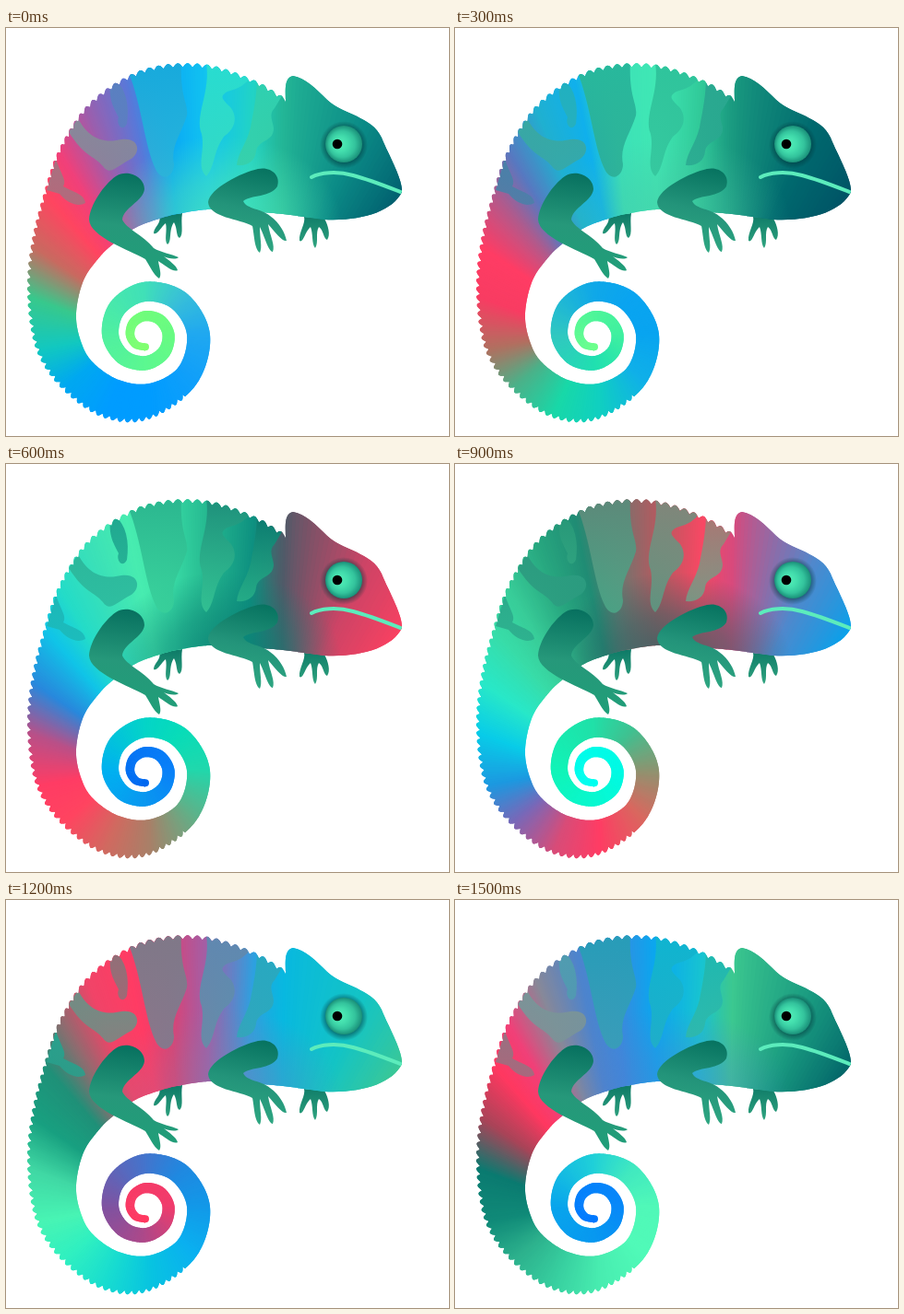
Write an HTML page with a canvas that moves like this. It is 480x443 px and loops after 1800 ms.

```html
<!DOCTYPE html>
<html lang="en">
<head>
<meta charset="utf-8">
<title>Chameleon</title>
<style>
html, body { margin: 0; width: 100%; height: 100%; overflow: hidden; background: #fff; }
canvas { display: block; width: 480px; height: 443px; }
</style>
</head>
<body>
<canvas id="stage" width="480" height="443"></canvas>
<script>
const ctx = document.getElementById('stage').getContext('2d');
const HOLD = 300;

// Cross sections from nose to tail: back x, y, belly x, y.
const ribs = [
  [455, 150, 410, 215], [385, 120, 345, 208], [303, 77, 300, 202], [270, 58, 262, 199],
  [220, 41, 220, 197], [170, 41, 185, 202], [130, 54, 163, 208], [88, 85, 140, 217],
  [58, 132, 118, 233], [42, 178, 102, 248], [28, 235, 84, 274], [24, 290, 76, 310],
  [33, 348, 81, 340], [60, 390, 94, 363], [105, 422, 122, 382], [155, 424, 155, 386]
];
// The curl shrinks by a fixed ratio each quarter turn.
for (let turn = -0.5; turn <= 7; turn += 0.5) {
  const a = -turn * Math.PI / 2, c = Math.cos(a), s = Math.sin(a);
  const out = 70 * Math.pow(0.82, turn), inn = 45 * Math.pow(0.8, turn);
  ribs.push([151 + out * c, 333 + out * s, 151 + inn * c, 333 + inn * s]);
}
const END = ribs.length - 1;
const TEETH_END = 15.7;

function rib(s) {
  const i = Math.min(Math.floor(s), END - 1), t = s - i;
  const at = k => ribs[Math.max(0, Math.min(END, k))];
  const [a, b, c, d] = [at(i - 1), at(i), at(i + 1), at(i + 2)];
  return b.map((v, k) => v + 0.5 * t * (c[k] - a[k] +
    t * (2 * a[k] - 5 * v + 4 * c[k] - d[k] + t * (3 * (v - c[k]) + d[k] - a[k]))));
}

// Lengthen a cross section by a number of pixels at both ends.
function stretch([x, y, u, v], pad) {
  const n = Math.hypot(x - u, y - v), dx = (x - u) / n * pad, dy = (y - v) / n * pad;
  return [x + dx, y + dy, u - dx, v - dy];
}

function bodyPath() {
  const p = new Path2D();
  let teeth = 0, last = rib(2);
  p.moveTo(last[0], last[1]);
  for (let s = 2; s <= END; s += 0.02) {
    const r = rib(s);
    // Teeth get narrower towards the tail.
    teeth += Math.hypot(r[0] - last[0], r[1] - last[1]) / (11.7 - 0.24 * s);
    last = r;
    const bump = s < TEETH_END ? 4.5 * Math.abs(Math.sin(Math.PI * teeth)) - 3.5 : 0;
    const [x, y] = stretch(r, bump);
    p.lineTo(x, y);
  }
  for (let s = END; s >= 1; s -= 0.05) {
    const r = rib(s);
    p.lineTo(r[2], r[3]);
  }
  p.lineTo(345, 208);
  p.bezierCurveTo(385, 210, 419, 199, 429, 178);
  p.bezierCurveTo(430, 165, 416, 140, 409, 124);
  p.bezierCurveTo(404, 110, 396, 104, 384, 98);
  p.bezierCurveTo(372, 91, 360, 89, 348, 78);
  p.bezierCurveTo(336, 66, 324, 54, 311, 52);
  p.bezierCurveTo(301, 54, 303, 68, 303, 78);
  p.closePath();
  return p;
}
const body = bodyPath();

const stripes = [
  'M272 58C271 80 267 96 265 108C261 125 251 136 250 149C261 150 270 145 271 134C273 121 290 124 290 109C289 100 284 94 291 87L300 72Z',
  'M217 38C222 70 204 95 212 115C216 135 206 150 217 161C227 150 224 135 236 118C250 108 250 96 244 87C237 79 229 75 240 69Q258 65 266 52Z',
  'M132 46C148 85 150 130 163 155C171 168 182 160 182 148C178 128 190 115 196 95C198 82 188 75 190 36Z',
  'M118 56C130 66 134 84 131 104C126 114 119 104 122 97C118 88 111 80 113 60Z',
  'M68 113L78 98C90 122 108 125 125 121C146 118 147 138 132 144C118 152 112 160 105 150C95 138 85 140 68 113Z',
  'M54 142C60 160 66 165 62 172C72 178 85 180 86 190C78 195 66 190 58 180L44 176Z'
].map(d => new Path2D(d));
const stripeSpan = [[60, 150], [42, 161], [42, 163], [58, 110], [100, 155], [145, 192]];

// Colours sit at these cross sections.
const stops = [0, 1, 2, 3, 4, 5, 6, 7, 8, 9, 10, 11, 12, 13, 14, 15, 16, 17, 18, 19, 21, 23, 25, END];
// skin: nose to tail; marks and tips: stripe tops and bottoms; belly: shade and strength.
const looks = [
  {
    skin: '005a6c 0b8a86 23b596 22d3c5 12c4f0 0aa6f5 5a78d8 9a5fae f0407a ff4560 c86a60 38c88c 12c8c0 00a8f0 009cff 009cff 109ffa 20a8f0 38bfd8 40e0b8 50f0a0 5cf890 68fb82 80ff70',
    marks: '2fd0b0 28dcd0 18aadc 5a80c0 87889a a8707f',
    tips: '38d0a8 38dcc0 2cb4d8 5a80c0 87889a a8707f', belly: '50e6b4', depth: 0.75
  },
  {
    skin: '005064 00696e 1a9a80 30c898 40e8b4 3ce0b8 10b0ec 20b0d0 5878c0 b05a8c ff3c64 f83c62 b07060 4cb088 18d8a8 10d0c0 10b0e8 08a4f0 0aa4f0 10a8e8 30c8c0 20e0b0 40f0a0 6cff8c',
    marks: '2aa890 2fc49c 28b89c 20b0c0 38a8a4 4a80a8',
    tips: '2aa890 34c49c 2cac94 28b0b8 38a8a4 4a80a8', belly: '48c4a4', depth: 0.5
  },
  {
    skin: 'ff4060 cc4466 505a68 0e9080 25b890 3ce0a8 48ecb0 3ae0b8 24dcc8 10c4e8 2888dc b85088 ff3c64 ff4460 d06a60 a88068 60b088 20d8ac 08dcb8 04d4c8 00b0f0 0a96f0 0a80f8 0068f0',
    marks: '0c7c70 1f927c 2cb890 20a890 2cb89c 1cb8b8',
    tips: '28b088 35c494 38d09a 20a890 2cb89c 1cb8b8', belly: '0a8074', depth: 0.85
  },
  {
    skin: '00a4ee 5088cc d84a7c f84864 b45a60 6c7870 208c74 28a880 38cc98 38dca8 28e8c8 08cce8 1c98e0 7868b8 d84c78 ff3c64 d8685f 8c9470 40c090 20e0a8 10f4b8 08f8d0 00fae4 00fff0',
    marks: 'a87874 80867a 5c8a7a 289878 2c9c80 2cac8c',
    tips: '70a088 5a9c84 4ca888 30a480 2c9c80 2cac8c', belly: '2a6264', depth: 0.85
  },
  {
    skin: '40c890 14c4c4 08b8e0 2ea0e0 a060a8 e04070 ff3c64 f04468 886e70 1f9078 18a080 40d8a4 48f4b4 30f0c0 18dcd0 08c4e0 0ab0f0 1298e8 2088e0 4474cc 8052a0 b04888 f03c6c ff3860',
    marks: '28a8c0 6088b0 807888 907078 728c84 28a08c',
    tips: '30a8b8 6090a8 788090 907078 728c84 28a08c', belly: '8878a8', depth: 0.45
  },
  {
    skin: '005f66 18987f 3cc890 18c4d0 08a8f0 3c88dc 4e84cc 888898 f04078 ff3860 a84458 0a7a70 108a78 2cb08c 38d0a0 48ecb0 50fab8 50f8b8 40e8c0 20d0d8 08a4ec 0898f0 0888f8 0078ff',
    marks: '20b8b0 10b4d0 289cb8 509cb0 7a9498 9a7080',
    tips: '30b8a8 20b0c4 38a0b4 509cb0 7a9498 9a7080', belly: '5080d0', depth: 0.5
  }
];
const rgb = hex => [0, 2, 4].map(i => parseInt(hex.substr(i, 2), 16));
for (const look of looks) {
  for (const part of ['skin', 'marks', 'tips']) look[part] = look[part].split(' ').map(rgb);
  look.belly = rgb(look.belly);
}
const css = (c, alpha = 1) => `rgba(${c.map(Math.round)},${alpha})`;

function skinAt(skin, s) {
  let i = 0;
  while (i < stops.length - 2 && stops[i + 1] < s) i++;
  const t = Math.min(1, (s - stops[i]) / (stops[i + 1] - stops[i]));
  return css(skin[i].map((v, k) => v + (skin[i + 1][k] - v) * t));
}

function blend(grad, ...list) {
  list.forEach((c, i) => grad.addColorStop(i / (list.length - 1), c));
  return grad;
}

function disc(x, y, r, fill) {
  ctx.fillStyle = fill;
  ctx.beginPath();
  ctx.arc(x, y, r, 0, 7);
  ctx.fill();
}

function paintBelly(look) {
  ctx.save();
  ctx.translate(235, 212);
  ctx.scale(1.35, 1);
  disc(0, 0, 95, blend(ctx.createRadialGradient(0, 0, 0, 0, 0, 95),
    css(look.belly, look.depth), css(look.belly, look.depth * 0.6), css(look.belly, 0)));
  ctx.restore();
}

function paintSkin(look) {
  ctx.save();
  ctx.clip(body);
  const step = 0.05;
  for (let s = 0; s < END; s += step) {
    const pad = s < 2.5 ? 40 : s < 16 ? 5 : 2;
    const a = stretch(rib(s), pad), b = stretch(rib(Math.min(END, s + step * 2)), pad);
    ctx.fillStyle = skinAt(look.skin, s);
    ctx.beginPath();
    ctx.moveTo(a[0], a[1]);
    ctx.lineTo(b[0], b[1]);
    ctx.lineTo(b[2], b[3]);
    ctx.lineTo(a[2], a[3]);
    ctx.fill();
  }
  ctx.save();
  ctx.beginPath();
  ctx.rect(100, 90, 300, 160);
  ctx.clip();
  paintBelly(look);
  ctx.restore();
  stripes.forEach((path, i) => {
    const [top, bottom] = stripeSpan[i];
    ctx.fillStyle = blend(ctx.createLinearGradient(0, top, 0, bottom),
      css(look.marks[i]), css(look.tips[i], 0.85));
    ctx.fill(path);
  });
  ctx.restore();
  disc(151, 346.2, 4, skinAt(look.skin, END));
}

const farFeet = [
  new Path2D('M166 204C169 212 160 216 160 223C164 225 168 216 173 212C175 220 171 231 175 235C180 232 176 219 182 211C186 218 184 226 188 228C193 224 189 212 191 201Z'),
  new Path2D('M323 205C325 212 317 222 318 231C322 234 324 221 330 216C333 224 331 234 335 239C339 233 335 222 339 216C344 219 344 229 348 230C352 225 349 214 345 207Z')
];
const rearLeg = new Path2D('M119 161C131 153 150 161 150 175C149 188 127 195 126 208C130 218 148 224 160 239C168 244 179 245 187 249C184 252 175 250 171 248C177 253 184 257 186 263C182 266 171 257 165 253C166 260 169 268 166 272C160 268 156 259 151 251C134 241 91 227 90 208C91 192 106 170 119 161Z');
const frontLeg = new Path2D('M273 153C287 150 298 160 294 172C287 184 265 181 257 188C261 197 277 196 286 204C297 212 302 222 304 231C299 232 292 222 284 213C286 226 292 236 289 243C284 242 281 228 275 216C275 229 278 238 275 244C269 240 269 224 267 215C253 207 220 206 219 189C221 174 255 157 273 153Z');

function paintFarFeet() {
  ctx.fillStyle = blend(ctx.createLinearGradient(0, 200, 0, 238), '#0c7866', '#2fa37f');
  farFeet.forEach(f => ctx.fill(f));
}

function paintLegs() {
  ctx.fillStyle = blend(ctx.createLinearGradient(135, 158, 122, 272), '#07705f', '#26987a', '#1f9f78');
  ctx.fill(rearLeg);
  ctx.fillStyle = blend(ctx.createLinearGradient(280, 153, 262, 244), '#077360', '#23947a', '#2fa882');
  ctx.fill(frontLeg);
}

function paintFace() {
  disc(366, 127, 26, blend(ctx.createRadialGradient(366, 127, 18, 366, 127, 26),
    'rgba(0,50,55,.6)', 'rgba(0,50,55,0)'));
  disc(366, 126, 20, blend(ctx.createRadialGradient(360, 126, 3, 366, 126, 20),
    '#50ecb6', '#42dcac', '#33c39c', '#1a9079'));
  disc(359, 126, 5.3, '#000');
  ctx.strokeStyle = '#5cecbc';
  ctx.lineWidth = 4;
  ctx.lineCap = 'round';
  ctx.save();
  ctx.clip(body);
  ctx.stroke(new Path2D('M331 162C340 157 358 155 376 160C395 165 412 172 430 179'));
  ctx.restore();
}

function draw(look) {
  ctx.fillStyle = '#fff';
  ctx.fillRect(0, 0, 480, 443);
  paintFarFeet();
  paintSkin(look);
  paintLegs();
  paintFace();
}

let shown = -1;
const start = performance.now();
function tick(now) {
  const i = Math.floor(Math.max(0, now - start) / HOLD) % looks.length;
  if (i !== shown) draw(looks[shown = i]);
  requestAnimationFrame(tick);
}
tick(start);
</script>
</body>
</html>
```
